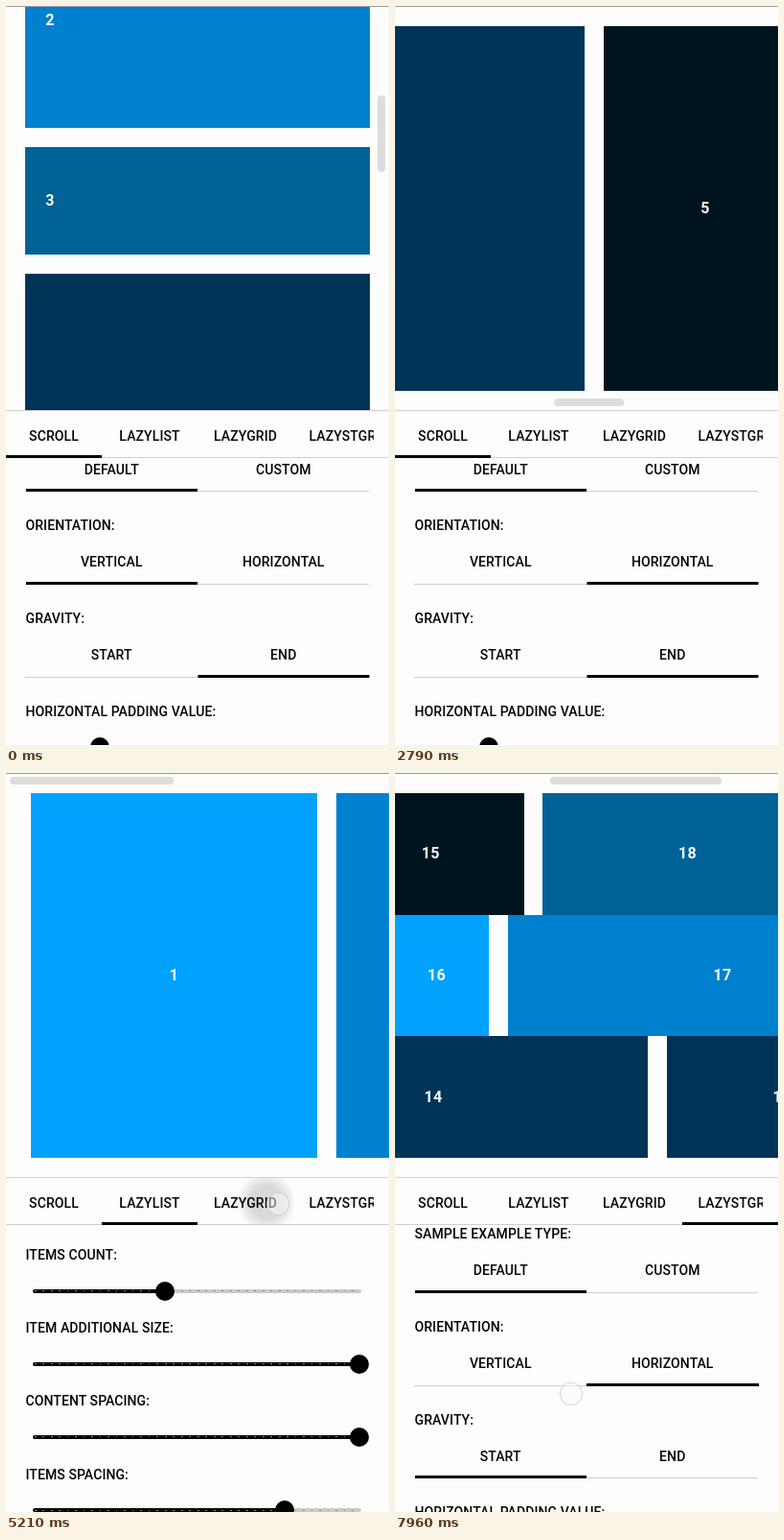
Animation of 400x770 px, one loop 8000 ms. Source, as an HTML page:

```html
<!DOCTYPE html>
<html lang="en">
<head>
<meta charset="utf-8">
<title>Scrollbar settings demo</title>
<style>
  html, body { margin: 0; width: 100%; height: 100%; overflow: hidden; background: #fdfdfd; }
  #stage {
    position: relative; width: 400px; height: 770px; overflow: hidden;
    background: #fdfdfd; color: #050505; font: 500 14px/20px Roboto, Arial, sans-serif;
    letter-spacing: .1px;
    --std: cubic-bezier(.4, 0, .2, 1);
  }
  #stage * { position: absolute; box-sizing: border-box; }
  .fill { inset: 0; }
  .anim { animation: 8s linear infinite; }

  /* preview area */
  #preview { left: 0; top: 0; width: 400px; height: 421px; overflow: hidden; }
  .item {
    color: #f8fbfd; font-weight: 700; font-size: 16px; letter-spacing: .3px;
    display: flex; align-items: center; justify-content: center;
  }
  .item.left { justify-content: flex-start; padding-left: 21px; }
  .item span { position: static !important; }
  .bar { background: #dcdddc; border-radius: 4px; height: 8px; top: 4px; }
  .edge { left: 0; width: 400px; height: 1px; background: #cfcfd1; }

  /* settings */
  #settings { clip-path: inset(471px 0 0 0); }
  .txt { white-space: nowrap; }
  .mid { text-align: center; }
  .line { left: 20px; width: 359px; height: 1px; background: #cfcfd2; }
  .mark { height: 3px; background: #000; }
  .track { left: 28px; width: 343px; height: 4px; border-radius: 2px; background: #c9c9c9; overflow: hidden; }
  .track i { left: 0; top: 0; height: 4px; background: #000; }
  .track::after {
    content: ""; position: absolute; left: 2px; right: 2px; top: 1.5px; height: 1px;
    background: repeating-linear-gradient(90deg, #8c8c8c 0 1.5px, transparent 1.5px 8.5px);
  }
  .thumb { width: 20px; height: 20px; border-radius: 50%; background: #000; }
  .rip { overflow: hidden; }
  .rip i {
    border-radius: 50%; opacity: 0;
    background: radial-gradient(closest-side, rgba(0, 0, 0, .14) 55%, rgba(0, 0, 0, 0));
    animation: ripple 8s linear var(--d) infinite;
  }
  #touch {
    left: -12px; top: -12px; width: 24px; height: 24px; border-radius: 50%;
    background: rgba(252, 252, 252, .5); border: 1.5px solid rgba(190, 190, 196, .6);
    animation: touchMove 8s linear infinite, touchShow 8s step-end infinite;
  }

  @keyframes ripple {
    0% { transform: scale(.1); opacity: 1; }
    2.8% { transform: scale(1); opacity: 1; }
    4% { transform: scale(1); opacity: 1; }
    6.5%, 100% { transform: scale(1); opacity: 0; }
  }

  /* cross-fades between samples */
  @keyframes showV {
    0%, 12.1% { opacity: 1; animation-timing-function: var(--std); }
    15.5%, 100% { opacity: 0; }
  }
  @keyframes showH {
    0%, 12.1% { opacity: 0; animation-timing-function: var(--std); }
    15.5%, 54.5% { opacity: 1; animation-timing-function: var(--std); }
    57.9%, 100% { opacity: 0; }
  }
  @keyframes showL {
    0%, 54.5% { opacity: 0; animation-timing-function: var(--std); }
    57.9%, 65.7% { opacity: 1; animation-timing-function: var(--std); }
    69.1%, 100% { opacity: 0; }
  }
  @keyframes showG {
    0%, 65.7% { opacity: 0; animation-timing-function: var(--std); }
    69.1%, 76.5% { opacity: 1; animation-timing-function: var(--std); }
    79.9%, 100% { opacity: 0; }
  }
  @keyframes showS {
    0%, 76.5% { opacity: 0; animation-timing-function: var(--std); }
    79.9%, 100% { opacity: 1; }
  }
  @keyframes showScrollPanel {
    0%, 54.5% { opacity: 1; animation-timing-function: var(--std); }
    57.9%, 100% { opacity: 0; }
  }
  @keyframes showGridPanel {
    0%, 65.7% { opacity: 0; animation-timing-function: var(--std); }
    69.1%, 100% { opacity: 1; }
  }

  /* dragging and flinging the row, with its scrollbar */
  @keyframes rowScroll {
    0%, 16.9% { transform: translateX(0); }
    20%, 21.9% { transform: translateX(-120px); }
    24.5% { transform: translateX(-282px); }
    25.6% { transform: translateX(-310px); animation-timing-function: ease-out; }
    31%, 41.6% { transform: translateX(-530px); }
    44.25% { transform: translateX(-722px); }
    45% { transform: translateX(-748px); animation-timing-function: ease-out; }
    50%, 100% { transform: translateX(-850px); }
  }
  @keyframes rowBar {
    0%, 16.9% { transform: translateX(92px); }
    20%, 21.9% { transform: translateX(105px); }
    24.5% { transform: translateX(123px); }
    25.6% { transform: translateX(128px); animation-timing-function: ease-out; }
    31%, 41.6% { transform: translateX(166px); }
    44.25% { transform: translateX(200px); }
    45% { transform: translateX(204px); animation-timing-function: ease-out; }
    50%, 100% { transform: translateX(222px); }
  }
  @keyframes barSide {
    0% { top: 409px; }
    39.4%, 100% { top: 4px; }
  }
  @keyframes stagBar {
    0%, 83.9% { transform: translateX(153px); }
    85.4%, 100% { transform: translateX(162px); }
  }

  /* tab indicators */
  @keyframes mainMark {
    0%, 54.5% { transform: translateX(0); animation-timing-function: var(--std); }
    57.625%, 65.7% { transform: translateX(100px); animation-timing-function: var(--std); }
    68.825%, 76.5% { transform: translateX(200px); animation-timing-function: var(--std); }
    79.625%, 100% { transform: translateX(300px); }
  }
  @keyframes toRight {
    0%, 12.1% { transform: translateX(0); animation-timing-function: var(--std); }
    15.225%, 100% { transform: translateX(179.5px); }
  }
  @keyframes toLeft {
    0%, 39.4% { transform: translateX(179.5px); animation-timing-function: var(--std); }
    42.525%, 100% { transform: translateX(0); }
  }
  @keyframes panelScroll {
    0%, 87.5% { transform: translateY(0); }
    91.25% { transform: translateY(-240px); animation-timing-function: ease-out; }
    95.6%, 96.25% { transform: translateY(-330px); }
    99.5%, 100% { transform: translateY(-423px); }
  }

  /* finger */
  @keyframes touchMove {
    0%, 12.1% { transform: translate(290px, 580px); }
    16.9% { transform: translate(330px, 290px); }
    20% { transform: translate(210px, 292px); }
    21.9% { transform: translate(330px, 294px); }
    24.5% { transform: translate(167px, 294px); }
    25.6% { transform: translate(139px, 294px); }
    38.1%, 39.4% { transform: translate(110px, 677px); }
    41.6% { transform: translate(298px, 275px); }
    44.25% { transform: translate(106px, 275px); }
    45% { transform: translate(80px, 275px); }
    53.3%, 54.5% { transform: translate(150px, 449px); }
    64.3%, 65.7% { transform: translate(284px, 449px); }
    75.2%, 76.5% { transform: translate(350px, 449px); }
    87.5% { transform: translate(190px, 700px); }
    91.25% { transform: translate(186px, 460px); }
    96.25% { transform: translate(187px, 740px); }
    99.5%, 100% { transform: translate(184px, 647px); }
  }
  @keyframes touchShow {
    0%, 12.1%, 20%, 25.6%, 39.4%, 45%, 54.5%, 65.7%, 76.5%, 91.25% { opacity: 0; }
    10.9%, 16.9%, 21.9%, 38.1%, 41.6%, 53.3%, 64.3%, 75.2%, 87.5%, 96.25%, 100% { opacity: 1; }
  }
</style>
</head>
<body>
<div id="stage">
  <div id="preview"></div>
  <div id="settings" class="fill"></div>
  <div id="tabs" class="fill"></div>
  <div id="touch"></div>
</div>
<script>
const COLORS = ['#00a2fe', '#0081cf', '#006296', '#003457', '#001420'];
const $ = id => document.getElementById(id);

const box = (cls, x, y, w, h, style = '', inner = '') =>
  `<div class="${cls}" style="left:${x}px;top:${y}px;width:${w}px;height:${h}px;${style}">${inner}</div>`;
const anim = name => `animation-name:${name};`;
const layer = (name, inner) => `<div class="fill anim" style="${anim(name)}">${inner}</div>`;

// --- preview ---
const item = (n, x, y, w, h, cls = '') =>
  box('item ' + cls, x, y, w, h, `background:${COLORS[(n - 1) % 5]}`, `<span>${n}</span>`);
const column = (n, y, h) => item(n, 20.3, y, 359.4, h, 'left');
const row = (n, x, w) => item(n, x, 20.7, w, 380.6);
const cell = (n, lane, x, w) => item(n, x, 20.7 + lane * 126.87, w, 126.87);
const bar = (x, w) => `<div class="bar" style="left:${x}px;width:${w}px"></div>`;

const vertical = column(2, -97, 224.2) + column(3, 147.3, 111.7) + column(4, 278.7, 450) +
  box('bar', 388, 93, 8, 80);

const horizontal = layer('rowScroll',
  row(2, -99, 226.2) + row(3, 147, 111.7) + row(4, 278, 450) +
  row(5, 748, 212) + row(6, 979.5, 132.5) + row(7, 1132, 224)) +
  `<div class="bar" style="left:0;width:73px;animation:rowBar 8s linear infinite,barSide 8s step-end infinite"></div>`;

const list = row(1, 26, 299) + row(2, 345, 224) + bar(4, 171);

const grid = cell(4, 0, -380, 430) + cell(7, 0, 69, 197.5) + cell(8, 1, 69, 282) + cell(9, 2, 69, 270) +
  cell(10, 0, 371, 212) + cell(11, 1, 371, 300) + cell(12, 2, 371, 224) + bar(148, 158);

const staggered = cell(15, 0, -60, 194.5) + cell(18, 0, 154, 303) +
  cell(16, 1, -11, 109) + cell(17, 1, 118, 448) +
  cell(14, 2, -184, 448) + cell(19, 2, 284, 240) +
  `<div class="bar anim" style="left:0;width:179px;${anim('stagBar')}"></div>`;

$('preview').innerHTML = layer('showV', vertical) + layer('showH', horizontal) +
  layer('showL', list) + layer('showG', grid) + layer('showS', staggered);

// --- settings ---
const label = (s, y) => `<div class="txt" style="left:20.5px;top:${y - 10}px">${s}</div>`;
const centred = (s, x, y, w) => box('txt mid', x, y - 10, w, 20, '', s);

// a soft circle growing from (cx, cy) inside its clipping box
const ripple = (x, y, w, h, cx, cy, r, delay) =>
  box('rip', x, y, w, h, '',
    `<i style="left:${cx - r - x}px;top:${cy - r - y}px;width:${2 * r}px;height:${2 * r}px;--d:${delay}ms"></i>`);

// selected: index of the chosen tab, or the name of the indicator's animation
function choice(names, y, selected) {
  const w = 359 / names.length;
  const moving = typeof selected === 'string';
  return names.map((s, i) => centred(s, 20.5 + i * w, y, w)).join('') +
    box('line', 20, y + 22.5, 359, 1) +
    box('mark' + (moving ? ' anim' : ''), 20.5 + (moving ? 0 : selected * w), y + 20.5, w, 3,
      moving ? anim(selected) : '');
}

function slider(name, y, x) {
  const cy = y + 37.5;
  return label(name, y) +
    box('track', 28, cy - 2, 343, 4, '', `<i style="width:${x - 28}px"></i>`) +
    box('thumb', x - 10, cy - 10, 20, 20);
}

const sliders = (y, count) => slider('ITEMS COUNT:', y, count) +
  slider('ITEM ADDITIONAL SIZE:', y + 76.2, 369) +
  slider('CONTENT SPACING:', y + 152.4, 369) +
  slider('ITEMS SPACING:', y + 228.6, 291);

const common = (y, orientation, gravity) =>
  label('SAMPLE EXAMPLE TYPE:', y) + choice(['DEFAULT', 'CUSTOM'], y + 38, 0) +
  label('ORIENTATION:', y + 96.7) + choice(['VERTICAL', 'HORIZONTAL'], y + 134.8, orientation) +
  label('GRAVITY:', y + 193.3) + choice(['START', 'END'], y + 231.5, gravity) +
  slider('HORIZONTAL PADDING VALUE:', y + 290, 98);

const scrollPanel = ripple(200, 554, 179.5, 48, 290, 578, 130, 870) +
  ripple(20.5, 651, 179.5, 48, 110, 675, 130, 3050) +
  common(444.5, 'toRight', 'toLeft');

const listPanel = sliders(502, 166) + common(806.8, 1, 0);

const gridPanel = layer('panelScroll',
  label('SPAN COUNT:', 502) + choice(['SPAN_1', 'SPAN_2', 'SPAN_3'], 540, 2) +
  sliders(598.6, 225) + common(903.4, 1, 0));

$('settings').innerHTML = layer('showScrollPanel', scrollPanel) +
  layer('showL', listPanel) + layer('showGridPanel', gridPanel);

// --- main tabs ---
const tab = (s, i) => centred(s, i * 100, 447.5, 100);
$('tabs').innerHTML =
  box('edge', 0, 0, 400, 1, 'background:#99999b') +
  box('edge', 0, 421, 400, 1) + box('edge', 0, 470, 400, 1) +
  ripple(100, 422, 100, 48, 150, 447, 90, 4264) +
  ripple(200, 422, 100, 48, 272, 447, 90, 5150) +
  ripple(300, 422, 100, 48, 350, 447, 90, 6020) +
  ['SCROLL', 'LAZYLIST', 'LAZYGRID'].map(tab).join('') +
  box('txt', 316.5, 437.5, 67, 20, 'overflow:hidden', 'LAZYSTGRID') +
  box('mark anim', 0, 468, 100, 3, anim('mainMark'));
</script>
</body>
</html>
```
